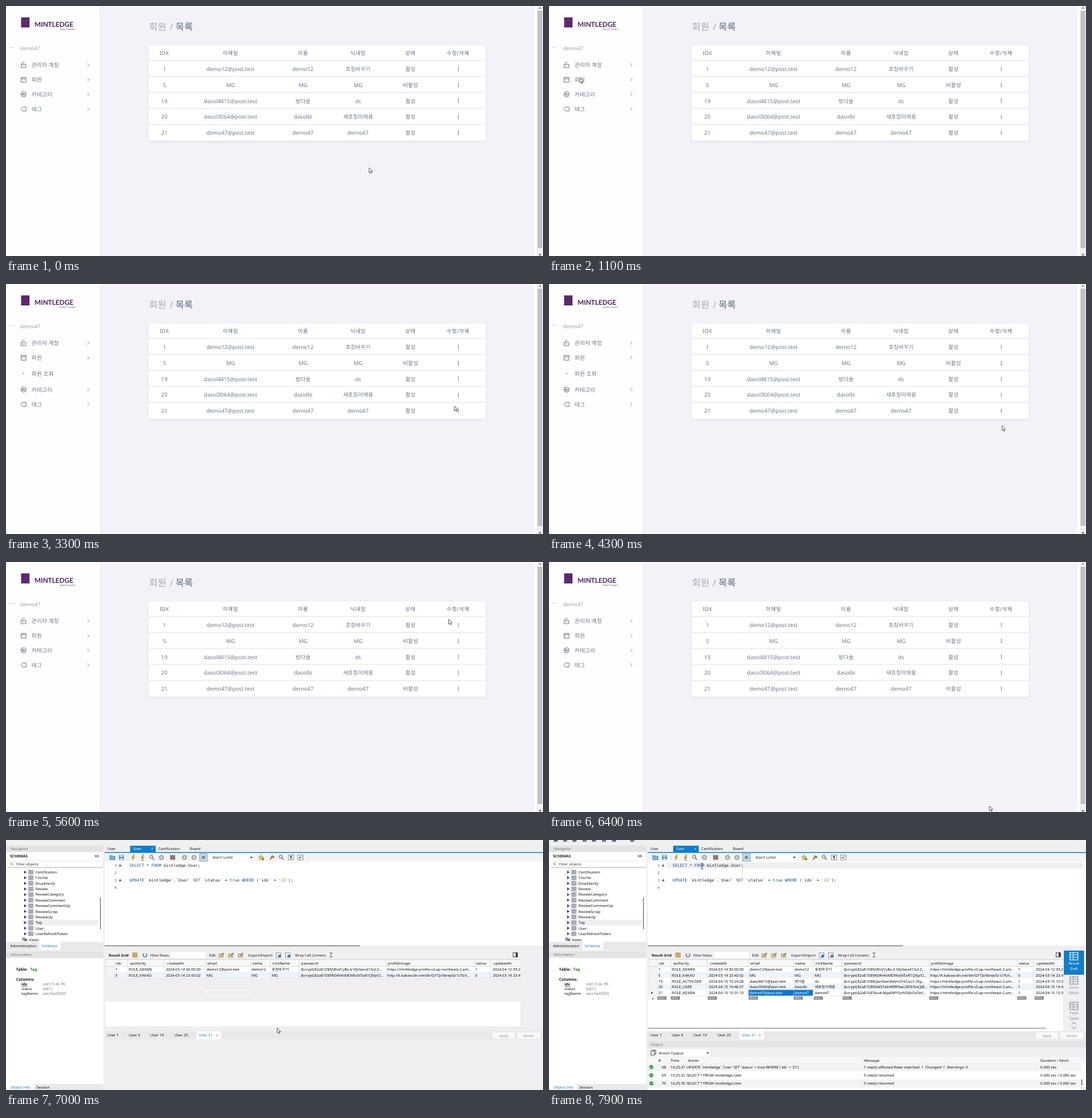
Recreate the animation shown at these times as an HTML page. Size 800 by 373 pixels, loop 8 s.

```html
<!DOCTYPE html>
<html lang="ko">
<head>
<meta charset="utf-8">
<title>Member list</title>
<style>
html, body { margin: 0; width: 100%; height: 100%; overflow: hidden; background: #f4f2f8; }
svg { display: block; width: 800px; height: 373px; }
text { font-family: "Noto Sans", "Noto Sans CJK KR", "Noto Sans CJK", sans-serif; text-rendering: geometricPrecision; white-space: pre; }
.mono { font-family: "DejaVu Sans Mono", monospace; }
.logo { font-family: Lato, sans-serif; }
</style>
</head>
<body>
<svg id="stage" viewBox="0 0 800 373" xmlns="http://www.w3.org/2000/svg"></svg>
<script>
const LOOP = 8000, STEP = 100;
const BLUE = '#0a7fd0', INK = '#1c1c20', SLATE = '#697a8d';

// markup helpers
const text = (x, y, s, size = 5.6, fill = INK, more = '') =>
  `<text x="${x}" y="${y}" font-size="${size}" fill="${fill}" ${more}>${s}</text>`;
const mid = (x, y, s, size, fill, more = '') => text(x, y, s, size, fill, `text-anchor="middle" ${more}`);
const rect = (x, y, w, h, fill, more = '') =>
  `<rect x="${x}" y="${y}" width="${w}" height="${h}" fill="${fill}" ${more}/>`;
const path = (d, stroke, w = 1, fill = 'none') =>
  `<path d="${d}" stroke="${stroke}" stroke-width="${w}" fill="${fill}"/>`;
const dot = (x, y, r, fill, more = '') => `<circle cx="${x}" cy="${y}" r="${r}" fill="${fill}" ${more}/>`;
const group = (id, body, more = '') => `<g id="${id}" ${more}>${body}</g>`;
const BOLD = 'font-weight="700"';

// ---------- member page ----------
const brand = 'mintledge';
const mail = { a: 'demo12@post.test', b: 'dasol4815@post.test', c: 'dasol3064@post.test', d: 'demo47@post.test' };
const members = [
  ['1', mail.a, 'demo12', '호칭바꾸기', '활성'],
  ['5', 'MG', 'MG', 'MG', '비활성'],
  ['19', mail.b, '방다솔', 'ds', '활성'],
  ['20', mail.c, 'dasolbi', '새호칭이에용', '활성'],
  ['21', mail.d, 'demo47', 'demo47', '']
];
const memberX = [236, 334.5, 442.5, 524.5, 602.5, 673.5];

function menuItem(y, label, icon) {
  return `<g transform="translate(0 ${y})">` + path(icon, SLATE, 0.9) +
    text(38, 3, label, 8.4, SLATE) + path('M121.3 -2.6l2.5 2.6l-2.5 2.6', '#8592a3', 0.8) + '</g>';
}

function sidebar() {
  const lock = 'M22.5 -0.8h7v4.8h-7zM24 -0.8v-1.4a2 2 0 0 1 3.8 -0.7M26 1v1.2';
  const box = 'M22.5 -3.5h7.4v7.2h-7.4zM22.5 -1.3h7.4';
  const ball = 'M22.3 0a3.9 3.9 0 1 0 7.8 0a3.9 3.9 0 1 0 -7.8 0M24 -2.7l2.2 2.2h3.6M26.2 -0.5l-2 3.4M26.2 -0.5l2 3.4M22.4 0h3.5';
  const label = 'M24.6 -2.9h5.4v5.8h-5.4l-2.3 -2.9z';
  return rect(0, 0, 140, 373, '#fefefe') + rect(140, 0, 1.2, 373, '#ebe9f1') +
    rect(22.5, 17, 12.5, 15, '#5b2a70') +
    text(42.5, 31, brand.toUpperCase(), 10, '#4c1c63', `${BOLD} class="logo"`) +
    text(80.5, 36, 'BOOTCAMP', 3.2, '#4c1c63', 'letter-spacing="0.6" class="logo"') +
    rect(4, 61.4, 8.5, 0.8, '#cdd3da') + text(21, 66, 'demo47', 7.8, '#97a2af') +
    menuItem(88, '관리자 계정', lock) + menuItem(110, '회원', box) +
    group('sub', dot(26, 133.5, 1.3, '#b4bdc6') + text(38, 136.5, '회원 조회', 8.4, SLATE)) +
    group('lower', menuItem(131.7, '카테고리', ball) + menuItem(153.7, '태그', label));
}

function memberTable() {
  let s = rect(212.5, 60.5, 502, 142, '#a5a6b8', 'rx="3" opacity=".22" filter="url(#soft)"') +
    rect(212.5, 59, 502, 142, '#fff', 'rx="3"');
  ['IDX', '이메일', '이름', '닉네임', '상태', '수정/삭제'].forEach((h, i) =>
    s += mid(memberX[i], 73.2, h, 7.8, '#566a7f', 'letter-spacing=".5"'));
  members.forEach((row, r) => {
    const y = 94 + r * 23.85;
    s += rect(212.5, y - 13.3, 502, 1.2, '#e8e8ee');
    row.forEach((v, i) => s += mid(memberX[i], y + 2.9, v, 8.1, SLATE, r === 4 && i === 4 ? 'id="state"' : ''));
    for (const d of [-2.3, 0, 2.3]) s += dot(674, y + d, 0.8, '#5d6b7c');
  });
  return s;
}

function page() {
  return rect(0, 0, 800, 373, '#f4f2f8') + sidebar() + rect(140, 0, 660, 1.2, '#fbfafc') +
    text(213, 36.2, '회원', 14, '#a1acb8', 'font-weight="300"') +
    text(244, 36.2, '/', 13.5, '#a1acb8', 'font-weight="300"') +
    text(252.5, 36.2, '목록', 14, '#566a7f') + memberTable() +
    group('popup', rect(646, 203, 69.5, 21, '#fff', 'rx="2.5" stroke="#e2e2e9" stroke-width=".6"') +
      path('M656.5 210.3h6M657.3 210.3v6.5h4.4v-6.5M658.5 209h2', SLATE, 0.8) +
      text(667, 216.6, '삭제', 8.1, SLATE)) +
    rect(787, 0, 3.5, 373, '#fdfdfd') + rect(790.5, 0, 9.5, 373, '#f1f1f1') +
    rect(792, 7, 7, 354, '#c1c1c1') +
    path('M793.3 4l2.2 -2.4l2.2 2.4z', 'none', 0, '#888') +
    path('M793.3 370.3l2.2 2.4l2.2 -2.4z', 'none', 0, '#555');
}

// ---------- database client ----------
function schemas() {
  const tables = ['Certification', 'Course', 'EmailVerify', 'Review', 'ReviewCategory', 'ReviewComment',
    'ReviewCommentUp', 'ReviewScrap', 'ReviewUp', 'Tag', 'User', 'UserRefreshToken'];
  let s = rect(0, 8, 145, 10, '#e4e3e6') + text(7, 15.2, 'Navigator', 5.6, '#777') +
    rect(0, 18, 145, 134, '#fff') + text(6, 26, 'SCHEMAS', 5.6, INK, BOLD) +
    path('M133 24h4.5M134.5 22.3l-2 1.7l2 1.7M136 22.3l2 1.7l-2 1.7', '#333', 0.8) +
    rect(3, 31.5, 141, 9.5, '#fff', 'stroke="#dedee2" stroke-width=".6"') + rect(3, 40.7, 141, 0.6, '#98989e') +
    dot(8, 35.3, 1.5, 'none', 'stroke="#666" stroke-width=".6"') + path('M9 36.5l1.6 1.7', '#666', 0.7) +
    text(15, 38, 'Filter objects', 5.6, '#444') + rect(24, 119, 114, 8.5, '#f0f0f3');
  tables.forEach((name, i) => {
    const y = 48 + i * 8.36;
    s += path(`M27 ${y - 2.3}l3.8 2.3l-3.8 2.3z`, 'none', 0, '#444') +
      rect(33.8, y - 3, 6.4, 6, '#b9c2cc', 'stroke="#75818e" stroke-width=".6"') +
      path(`M33.8 ${y - 1}h6.4M33.8 ${y + 1}h6.4M36.8 ${y - 3}v6`, '#75818e', 0.4) + text(44, y + 2, name);
  });
  return s + rect(24, 145.3, 4.5, 5, '#9ea4aa') + rect(27, 147, 4.5, 4, '#777e86') + text(34, 150.6, 'Views') +
    rect(140, 86, 1.3, 47, '#7c7c80') +
    rect(0, 152, 145, 11.5, '#e9e8eb') + rect(50, 152, 31, 11.5, '#fff') +
    text(6, 159.6, 'Administration') + text(53, 159.6, 'Schemas', 5.6, BLUE);
}

function info() {
  const cols = [['idx', 'int(11) AI PK'], ['status', 'bit(1)'], ['tagName', 'varchar(500)']];
  let s = rect(0, 166, 145, 10, '#e4e3e6') + text(7, 173.2, 'Information', 5.6, '#777') +
    rect(0, 176, 145, 188, '#fff') + text(15, 195.2, 'Table:', 5.9, INK, BOLD) +
    text(36, 195.2, 'Tag', 5.9, '#228b22', BOLD) + text(15, 209.6, 'Columns:', 5.9, INK, BOLD);
  cols.forEach(([name, type], i) => {
    const y = 217.3 + i * 7;
    s += text(23, y, name, 5.6, INK, i ? '' : `${BOLD} text-decoration="underline"`) + text(55, y, type, 5.9, '#777');
  });
  return s + rect(0, 364, 145, 10, '#e9e8eb') + rect(0, 364, 41, 10, '#fff') +
    text(7, 371, 'Object Info', 5.6, BLUE) + text(45, 371, 'Session');
}

function toolbar() {
  const disc = (x, c) => dot(x, 26, 3.8, c) + dot(x, 26, 1.5, '#eee');
  const bolt = x => path(`M${x + 1} 22l-3 4.3h2.2l-1.2 4l4 -5.2h-2.4l1.8 -3.1z`, '#8f7430', 0.5, '#e8b83a');
  const lens = x => dot(x - 0.7, 25, 2.4, '#d7e5f0', 'stroke="#666" stroke-width=".9"') + path(`M${x + 1} 26.8l2.6 2.8`, '#a46a38', 1.3);
  const mark = (x, sign) => rect(x - 3.7, 22.3, 7.6, 7.4, '#f7f7f7', 'stroke="#777" stroke-width=".7"') + mid(x, 28, sign, 5.6, '#333', BOLD);
  const tabs = [[151, 'User'], [227, 'Certification'], [274, 'Board']];
  return tabs.map(([x, n]) => text(x, 15, n)).join('') +
    rect(185, 8.5, 38, 10, BLUE) + text(189.5, 15, 'User', 5.6, '#fff') +
    path('M216.3 11.5l3 3M219.3 11.5l-3 3', '#cfe6f8', 0.6) + rect(147, 18, 653, 1.5, BLUE) +
    rect(147, 19.5, 653, 12.5, '#f3f3f5') +
    path('M154.5 23h3l1 1h4v5.5h-8z', '#3f7daf', 0.6, '#74b1dd') +
    rect(168.5, 22.5, 7, 7, '#4e7ea8') + rect(170, 22.8, 4, 2.5, '#dbe7f1') + rect(170, 27, 4, 2.5, '#dbe7f1') +
    rect(181.5, 21, 0.6, 10, '#ccc') + bolt(189) + bolt(203) + path('M203.5 27v3.5h2', '#666', 0.7) + lens(217) +
    disc(231.5, '#aaa') + rect(244.5, 22.5, 7.5, 7, '#8f7767') + path('M246 28l4.5 -4', '#d8534a', 1) +
    disc(266, '#a6aba6') + disc(280, '#aca8a8') +
    rect(288.8, 20.8, 10.8, 10.6, '#cfe5f7', 'stroke="#4b8fc6" stroke-width=".8"') + rect(291.5, 23.5, 5.4, 5, '#a08a60') +
    rect(304, 21.3, 66, 9.8, '#fff') + text(307.5, 28, "Don't Limit", 5.9) +
    path('M363.3 25l2.2 2.4l2.2 -2.4z', 'none', 0, '#333') +
    path('M380 22.2l1.2 2.5l2.6 .3l-2 1.9l.6 2.7l-2.4 -1.4l-2.4 1.4l.6 -2.7l-2 -1.9l2.6 -.3z', '#8f7a2c', 0.5, '#e6c344') +
    dot(383, 28.6, 1.8, '#4a9d40') + path('M393.3 29.3l3 -6l3.7 2.5l-4.2 1z', '#7d4e22', 0.9, '#d9974d') + lens(410) +
    mark(424.5, '¶') + mark(438.5, '↵') +
    rect(147, 157.4, 380, 0.9, '#77777b');
}

function windowFrame() {
  // drawn in stage coordinates above the scaled client area
  return rect(52, 8, 696, 11, '#fbfafc') + rect(52, 19, 696, 10.5, '#e7e6eb') + rect(52, 29.5, 696, 25, '#f0eff3') +
    rect(53, 9.5, 6, 6.5, '#3b7199') + text(61, 15.2, 'Qurell Workroom', 6, '#333') +
    path('M692 13.7h4.5M713 12.3h3.5v3.5h-3.5zM714 12.3v-1h3.5v3.5h-1M734.5 11.5l4 4M738.5 11.5l-4 4', '#333', 0.7) +
    path('M57.5 24l3.7 -3.4l3.7 3.4h-1v3.6h-2v-2.4h-1.5v2.4h-2v-3.6z', 'none', 0, '#36516f') +
    path('M71 29.5l3 -10h75l6 2l6 8z', 'none', 0, '#fbfafc') +
    text(76, 26.2, 'test - Warning - not supported', 4.9, '#333') + path('M148.5 22.5l3 3M151.5 22.5l-3 3', '#666', 0.6) +
    rect(265, 201.7, 45, 0.7, '#aaa');
}

const sql = s => s.replace(/SELECT|FROM|UPDATE|SET|WHERE|true/g, k => `<tspan fill="#0b559a">${k}</tspan>`)
  .replace("'21'", `<tspan fill="#c0701c">'21'</tspan>`);
const query = `SELECT * FROM ${brand}.User`;
const update = `UPDATE \`${brand}\`.\`User\` SET \`status\` = true WHERE (\`idx\` = '21')`;

function editor() {
  let s = rect(147, 32, 653, 125.4, '#fff') + rect(147, 157.4, 380, 0.9, '#77777b') +
    group('caretLine', rect(175, 33.3, 621, 9.2, '#efeff2'));
  for (let i = 0; i < 4; i++) {
    const y = 40.2 + i * 11;
    s += text(161.5, y, i + 1, 5.6, '#666', 'class="mono"');
    if (i % 2 === 0) s += dot(170, y - 2, 1.6, '#1f7cb5');
  }
  return s + text(184, 40.2, sql(query + ';'), 6.05, '#222', 'class="mono"') +
    text(184, 62.2, sql(update + ';'), 6.05, '#222', 'class="mono"');
}

const colX = [163, 183, 238, 299, 366, 396, 439, 568, 699, 725];
const edges = [148, 161, 181, 235, 297, 364, 393, 436, 566, 697, 721, 766];
const photo = `https://${brand}-profile.s3.ap-northeast-2.am...`;
const hash = s => '{bcrypt}$2a$10$' + s + '...';
const users = [
  ['1', 'ROLE_ADMIN', '2024-03-14 00:00:00', mail.a, 'demo12', '호칭바꾸기', hash('NSRvVCyBx.k10JvSwvd13uI.Z'), photo, '1', '2024-04-12 09:20'],
  ['5', 'ROLE_KAKAO', '2024-03-14 23:43:02', 'MG', 'MG', 'MG', hash('9A0WnfoMDWo6VSsR1Q9p/O'), 'http://k.kakaocdn.net/dn/GYTJz/btrep5z1z76/t...', '0', '2024-03-14 23:43'],
  ['19', 'ROLE_AUTHUSER', '2024-04-15 10:24:28', mail.b, '방다솔', 'ds', hash('8QwnEee3bAmLPxlUvu1.Sfg'), photo, '1', '2024-04-15 10:24'],
  ['20', 'ROLE_USER', '2024-04-15 14:46:07', mail.c, 'dasolbi', '새호칭이에용', hash('fb0dSTwh4RRPbaU3D9/9oOJB'), photo, '1', '2024-04-15 14:46'],
  ['21', 'ROLE_ADMIN', '2024-04-15 15:31:10', mail.d, 'demo47', 'demo47', hash('TAiuk/MJaKNfYSnfx56bOoTeV'), photo, '1', '2024-04-15 15:31']
];

function gridRow(row, r) {
  const y = 193 + r * 8.75;
  let s = rect(148, y - 4.4, 618, 8.75, r % 2 ? '#edf4fa' : '#fff') + rect(148, y - 4.4, 13, 8.75, '#f3f3f5');
  row.forEach((v, i) => {
    const on = r === 4 && (i === 3 || i === 4);
    if (on) s += rect(edges[i + 1], y - 4.4, edges[i + 2] - edges[i + 1], 8.75, '#0a78d2');
    s += text(colX[i], y + 2, v, 5.5, on ? '#fff' : '#111');
  });
  return s + edges.map(x => rect(x, y - 4.4, 0.5, 8.75, '#d4d4d9')).join('') + rect(148, y + 4.1, 618, 0.4, '#dcdce1');
}

function gridBar() {
  const names = ['idx', 'authority', 'createdAt', 'email', 'name', 'nickName', 'password', 'profileImage', 'status', 'updatedAt'];
  const pencil = x => rect(x - 4, 170, 6.5, 5, '#f0cf7a', 'stroke="#8a7a4a" stroke-width=".6"') + path(`M${x - 1} 173l4.5 -4.5`, '#3f78a8', 1.2);
  const disk = x => rect(x - 3.5, 168.3, 7, 6.8, '#fff', 'stroke="#666" stroke-width=".6"') + rect(x - 0.5, 171, 4, 4, '#3f7fb5');
  return rect(147, 164.5, 619, 13.5, '#f0eff1') + text(153, 173.8, 'Result Grid', 5.4, INK, BOLD) +
    rect(188.8, 168.3, 6.6, 6.6, '#e3bd58', 'stroke="#8a7a4a" stroke-width=".6"') + path('M189 171.6h6.4M192 168.3v6.6', '#8a7a4a', 0.5) +
    path('M205.2 169.5a2.8 2.8 0 1 0 3.6 0', '#2f75b0', 1.2) +
    text(215, 173.8, 'Filter Rows:', 5.3) + rect(246, 167, 51, 9, '#fff') +
    text(302.5, 173.8, 'Edit:', 5.3) + pencil(321) + pencil(335.5) + pencil(350) +
    text(361, 173.8, 'Export/Import:', 5.3) + disk(406) + disk(420) +
    text(430.5, 173.8, 'Wrap Cell Content:', 5.3) + path('M482 168.5h4.5M482 174.5h4.5M484.2 169v5', '#555', 0.8) +
    rect(755.5, 168, 6.5, 6.5, '#fff', 'stroke="#333" stroke-width=".8"') + rect(759.3, 168, 2.7, 6.5, '#333') +
    rect(148, 178, 618, 10.7, '#f7f7f8') + rect(148, 177.8, 618, 0.6, '#b9b9be') + rect(148, 188.2, 618, 0.5, '#c4c4c9') +
    edges.map(x => rect(x, 178, 0.5, 10.7, '#cbcbd0')).join('') +
    names.map((n, i) => text(colX[i] + (i > 0 && i < 3 ? 2 : 1), 185.6, n, 5.5)).join('');
}

function resultTabs() {
  const tabs = [[151, 'User 1'], [183, 'User 6'], [215, 'User 19'], [251, 'User 25']];
  return rect(147, 285.5, 653, 12, '#e9e8eb') + tabs.map(([x, n]) => text(x, 293.4, n)).join('') +
    rect(284, 285.5, 36, 12, '#fff') + text(287.5, 293.4, 'User 31', 5.6, BLUE) +
    path('M312.6 290l3 3M315.6 290l-3 3', '#777', 0.6) +
    rect(725, 287, 33, 9.3, '#f9f9fa') + mid(741.5, 293.6, 'Apply', 5.4, '#999') +
    rect(762, 287, 34, 9.3, '#f9f9fa') + mid(779, 293.6, 'Revert', 5.4, '#999');
}

function fullResult() {
  let s = rect(147, 178, 619, 107.5, '#fff') + users.map(gridRow).join('') +
    rect(148, 280.4, 592, 1, '#77777b') +
    path('M152.3 226l2.6 2l-2.6 2z', 'none', 0, '#333') + text(153, 239.8, '*', 6);
  colX.forEach(x => s += rect(x - 1.5, 233.3, 13.5, 5, '#85858a') + text(x, 237.4, 'NULL', 4, '#fff'));
  s += rect(766, 164, 34, 121.5, '#f0eff1') + rect(767, 165, 30, 36, '#0e7ecb');
  [['Result', 'Grid', 186], ['Form', 'Editor', 222], ['Field', 'Types', 260]].forEach(([a, b, y], i) => {
    const c = i ? '#8c8c90' : '#fff';
    s += rect(776, y - 18, 12, 11, 'none', `stroke="${c}" stroke-width="1"`) +
      path(`M776 ${y - 14.5}h12M776 ${y - 11}h12M781 ${y - 18}v11`, c, 0.8) +
      mid(782, y, a, 5.6, c) + mid(782, y + 7.5, b, 5.6, c);
  });
  return s + path('M778.5 275l3.5 -3l3.5 3M778.5 278.5l3.5 3l3.5 -3', '#88888c', 1) + output();
}

function output() {
  const log = [
    ['68', '16:25:21', update, '1 row(s) affected Rows matched: 1  Changed: 1  Warnings: 0', '0.000 sec'],
    ['69', '16:25:22', query, '5 row(s) returned', '0.000 sec / 0.000 sec'],
    ['70', '16:25:35', query, '5 row(s) returned', '0.000 sec / 0.000 sec']
  ];
  const x = [168, 181, 205, 469, 732];
  let s = rect(147, 299.5, 653, 10.5, '#e4e3e6') + text(151, 307.3, 'Output', 5.6, '#777') +
    rect(147, 310, 653, 14, '#f0eff1') + rect(152, 315, 5, 6, '#fff', 'stroke="#444" stroke-width=".8"') +
    path('M154 315v-1.5h5v6h-2', '#444', 0.8) +
    rect(160.5, 312, 79, 11, '#fff') + text(163.5, 319.6, 'Action Output', 5.6) +
    path('M234.5 316.7l2 2.2l2 -2.2z', 'none', 0, '#333') +
    rect(147, 324, 653, 49, '#fff') + rect(147, 324, 653, 9.5, '#f6f6f8');
  ['#', 'Time', 'Action', 'Message', 'Duration / Fetch'].forEach((h, i) => s += text([163, 181, 207, 469, 732][i], 331, h, 5.6));
  log.forEach((row, r) => {
    const y = 338.8 + r * 12.2;
    s += rect(147, y - 6, 646, 12.2, r % 2 ? '#fff' : '#f3f3f5') + dot(152.5, y, 3, '#2c9a38') +
      path(`M151 ${y}l1.2 1.2l2 -2.4`, '#fff', 0.8);
    row.forEach((v, i) => s += text(x[i], y + 2, v, 5.55, '#111'));
  });
  return s + rect(793, 357, 1.5, 9, '#77777b') + path('M792.5 369l1.6 1.6l1.6 -1.6', '#777', 0.7);
}

function client() {
  const topIcons = [10, 24, 38, 53, 67, 82, 97, 124].map((x, i) => rect(x - 3, 0, 6, 2.6, i % 2 ? '#6d777f' : '#4f6f88')).join('');
  return group('frame', windowFrame()) +
    group('client', rect(0, 7.3, 800, 367, '#efeef1') + schemas() + info() + toolbar() +
      rect(298, 224.5, 66, 7.5, 'none', 'stroke="#fbfbfc" stroke-width="1"') +
      group('loaded', rect(0, 0, 800, 7.4, '#f0eff2') + editor() +
        group('partial', users.slice(0, 2).map(gridRow).join('') + rect(766, 178, 34, 32, '#efeef1') +
          rect(148, 241, 618, 37, '#fff')) +
        group('full', topIcons + fullResult()) + gridBar() +
        rect(766.2, 178, 0.8, 11, '#efeef1') + resultTabs()));
}

// ---------- scene ----------
const stage = document.getElementById('stage');
stage.innerHTML = '<defs><filter id="soft" x="-5%" y="-10%" width="110%" height="125%"><feGaussianBlur stdDeviation="2"/></filter></defs>' +
  group('page', page()) +
  group('db', rect(52, 8, 696, 365, '#efeef2') + client()) +
  group('arrow', path('M0 0v7.2l1.7 -1.5l1.1 2.5l1.2 -.5l-1.1 -2.5h2.3z', '#333', 0.7, '#fff')) +
  group('beam', path('M-1.8 -4.3h1.3l.5 .5l.5 -.5h1.3M0 -3.8v7.6M-1.8 4.3h1.3l.5 -.5l.5 .5h1.3', '#222', 0.7));

const $ = id => document.getElementById(id);
const show = (id, on) => $(id).setAttribute('display', on ? 'inline' : 'none');
const move = (id, x, y) => $(id).setAttribute('transform', `translate(${x} ${y})`);

// pointer path: time, x, y
const pointer = [
  [0, 541, 241.5], [500, 230, 100], [800, 62, 64], [1000, 46, 107], [1300, 46, 108], [1600, 52, 131], [1900, 54, 132],
  [2300, 202, 29.5], [2700, 540, 108], [3100, 660, 170], [3400, 672, 188], [3600, 672, 189], [3900, 675, 211.5],
  [5100, 675, 211.5], [5600, 659.5, 85.5], [6000, 534, 226], [6400, 656, 364], [6900, 656, 380],
  [7000, 404, 280.5], [7400, 330, 150], [7700, 230, 42], [7900, 228, 39]
];

function along(t) {
  const i = pointer.findIndex(p => p[0] > t);
  if (i < 0) return pointer[pointer.length - 1].slice(1);
  const [t0, x0, y0] = pointer[i - 1], [t1, x1, y1] = pointer[i];
  const k = (t - t0) / (t1 - t0);
  return [x0 + (x1 - x0) * k, y0 + (y1 - y0) * k];
}

function render(ms) {
  const t = Math.floor(ms % LOOP / STEP) * STEP;
  const open = t >= 4900 ? 0 : Math.min(1, Math.max(0, (t - 1200) / 300));
  $('sub').setAttribute('opacity', open);
  move('lower', 0, 25.9 * open);
  $('state').textContent = t >= 4900 ? '비활성' : '활성';
  show('popup', t >= 3500 && t < 4200);

  const opening = t === 6900;
  show('db', t >= 6900);
  show('frame', opening);
  show('loaded', !opening);
  show('partial', t === 7000);
  show('full', t >= 7100);
  show('caretLine', t >= 7800);
  $('client').setAttribute('transform', opening ? 'translate(51.3 48.2) scale(.87)' : '');

  const [x, y] = along(t), typing = t >= 7000 && y < 157;
  show('arrow', !typing && (t < 6500 || t >= 7000));
  show('beam', typing);
  move('arrow', x, y);
  move('beam', x, y);
}

const start = performance.now();
function tick() {
  render(performance.now() - start);
  requestAnimationFrame(tick);
}
tick();
</script>
</body>
</html>
```
